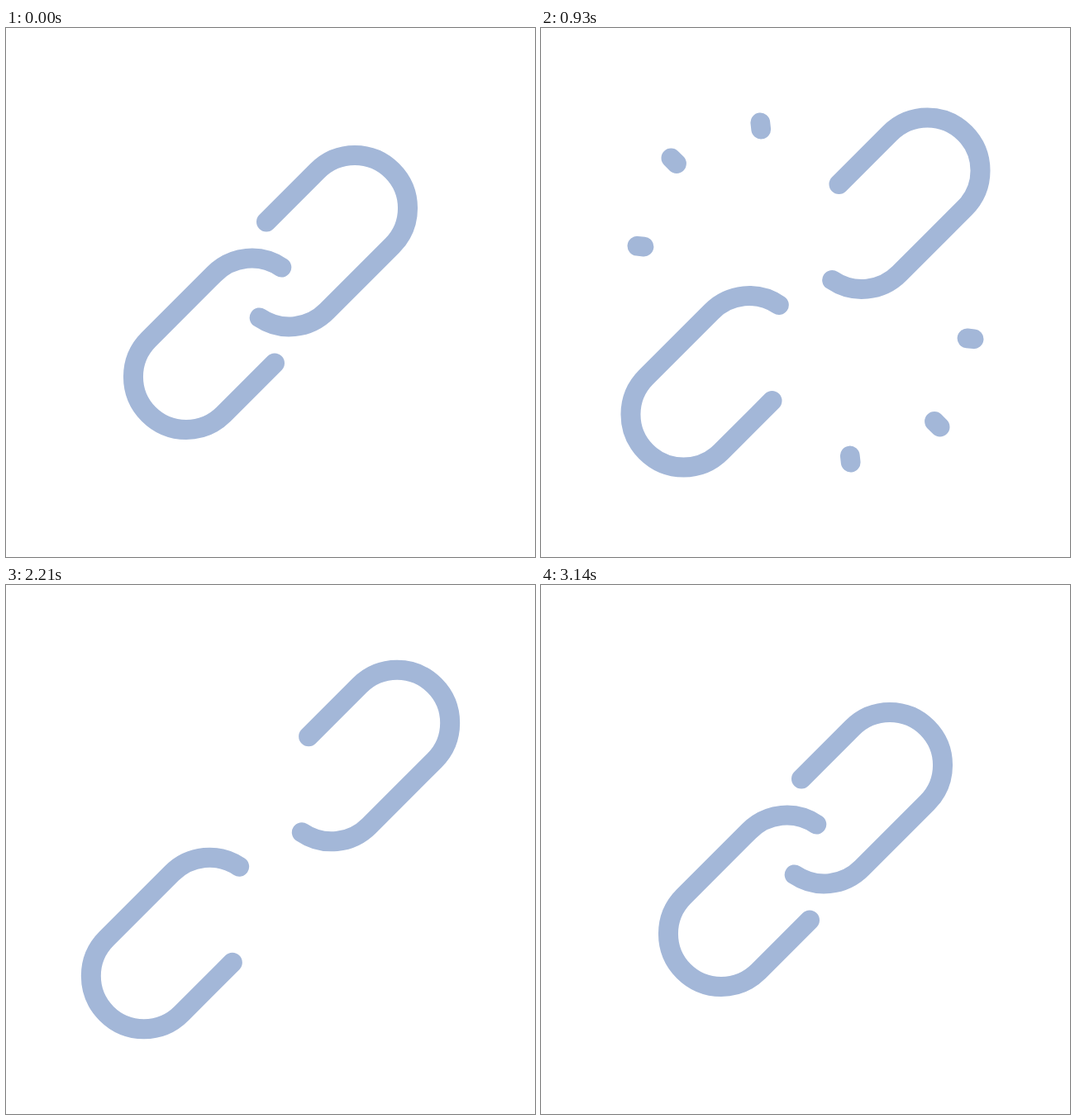
An HTML page for the animation above (3570 ms loop, 640 by 640 pixels).

```html
<!DOCTYPE html>
<html lang="en">
<head>
<meta charset="utf-8">
<title>Breaking link</title>
<style>
  html, body { margin: 0; height: 100%; overflow: hidden; background: #fff; }
  svg { display: block; width: 100%; height: 100%; }
</style>
</head>
<body>
<svg viewBox="0 0 640 640" fill="none" stroke="#a3b7d8" stroke-linecap="round">
  <g id="half">
    <path id="link" stroke-width="24"
      d="M315 234.4L376.7 172.7A64 64 0 0 1 467.3 263.3L388.3 342.3A64 64 0 0 1 306.7 350.4"/>
    <path id="sparks"/>
  </g>
  <use href="#half" transform="rotate(180 320 320)"/>
</svg>
<script>
const LOOP = 3570, FPS = 14;
const OPEN = 5.9, CLOSE = 43.55, SPAN = 13.4, SPARKS_FROM = 7, SPARKS_TO = 21;
const TRAVEL = 51.2;
// Inner and outer end of each spark's track
const tracks = [
  [275.5, 209, 264.1, 103],
  [235, 235, 148, 148],
  [211, 273.8, 105, 262.5]
];
const link = document.getElementById('link');
const sparks = document.getElementById('sparks');

// cubic-bezier(x1, 0, 0, 1), solved by bisection
function ease(p, x1) {
  if (p <= 0) return 0;
  if (p >= 1) return 1;
  let lo = 0, hi = 1, s;
  for (let i = 0; i < 30; i++) {
    s = (lo + hi) / 2;
    if (3 * x1 * s * (1 - s) ** 2 + s ** 3 < p) lo = s; else hi = s;
  }
  return s * s * (3 - 2 * s);
}

function pointAt([x0, y0, x1, y1], k) {
  return `${x0 + (x1 - x0) * k} ${y0 + (y1 - y0) * k}`;
}

function draw(ms) {
  // The motion advances in steps of 1/14 s
  const step = Math.floor(ms % LOOP * FPS / 1000 + 0.06);
  const opening = (step - OPEN) / SPAN;
  const closing = (CLOSE - step) / SPAN;

  const shift = TRAVEL * ease(Math.min(opening, closing), 0.32);
  link.setAttribute('transform', `translate(${shift} ${-shift})`);

  const head = ease(opening, 0.25), tail = ease(opening, 0.9);
  const visible = step >= SPARKS_FROM && step < SPARKS_TO;
  sparks.setAttribute('stroke-width', 5 + 21 * head);
  sparks.setAttribute('d', visible
    ? tracks.map(t => `M${pointAt(t, tail)}L${pointAt(t, head)}`).join('')
    : '');
}

const start = performance.now();
function tick() {
  draw(performance.now() - start);
  requestAnimationFrame(tick);
}
tick();
</script>
</body>
</html>
```
